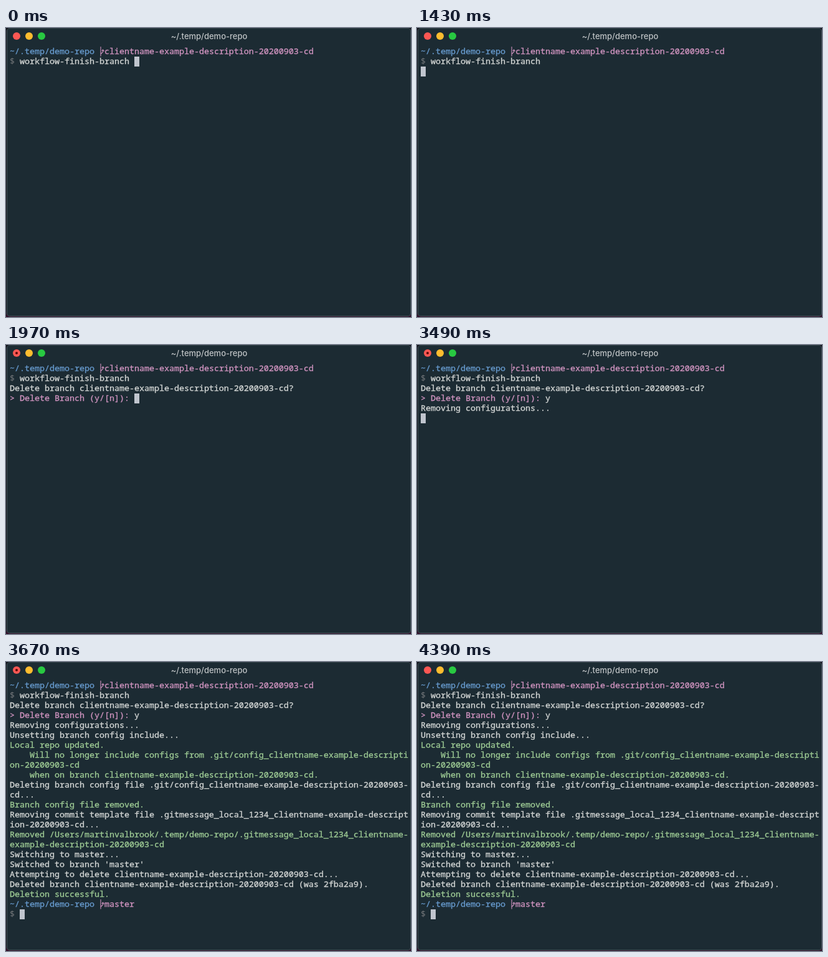
Recreate the animation shown at these times as an HTML page. Size 650 px wide and 465 px high, loop 7000 ms.

```html
<!DOCTYPE html>
<html lang="en">
<head>
<meta charset="utf-8">
<title>Terminal</title>
<style>
  html, body { margin: 0; width: 100%; height: 100%; overflow: hidden; background: #0e1018; }
  #stage { position: absolute; left: 0; top: 0; width: 650px; height: 465px; overflow: hidden;
    background: linear-gradient(#0e1018 455px, #35102c 465px); }
  #window { position: absolute; left: 1px; top: 0; width: 649px; height: 464px; box-sizing: border-box;
    background: #1c2b33; border: 1px solid #435158; border-top-color: #324047; border-radius: 5px; }
  #title { position: absolute; left: 1px; top: 5px; width: 650px; text-align: center;
    font: 500 13px/16px Inter, "Liberation Sans", sans-serif; color: #bfc3c5; }
  .light { position: absolute; top: 7px; width: 12px; height: 12px; border-radius: 50%; }
  .red { left: 11px; background: #fc5753; }
  .yellow { left: 31px; background: #fdbc2f; }
  .green { left: 51px; background: #28c941; }
  #edited { position: absolute; left: 4px; top: 4px; width: 4px; height: 4px; border-radius: 50%;
    background: #5a0507; animation: edited 7s step-end infinite; }

  #screen { position: absolute; left: 6px; top: 29px; margin: 0; color: #d2d5d4;
    font: 500 13.3333px/16px "Noto Sans Mono", "Liberation Mono", monospace;
    -webkit-text-stroke: 0.35px currentColor;
    font-variant-ligatures: none; white-space: pre; }
  #screen b, #screen i, #screen u, #screen s { font-weight: inherit; font-style: normal; text-decoration: none; }
  b { color: #6699cc; }
  i { color: #cf93bf; }
  u { color: #9dca94; }
  #screen s { color: #74777a; -webkit-text-stroke-width: 0; }
  #screen svg { width: 8px; height: 16px; vertical-align: top; overflow: visible;
    fill: none; stroke: #cf93bf; stroke-width: 1.1; }

  #cursor { position: absolute; left: 0; top: 0; width: 8px; height: 16px; background: #c0c5ce;
    animation: cursor 7s step-end infinite; }

  .ask { animation: ask 7s step-end infinite; }
  .answer { animation: answer 7s step-end infinite; }
  .work { animation: work 7s step-end infinite; }
  .done { animation: done 7s step-end infinite; }

  @keyframes ask { 0% { visibility: hidden; } 21.71%, 100% { visibility: visible; } }
  @keyframes answer { 0% { visibility: hidden; } 49.85%, 100% { visibility: visible; } }
  @keyframes work { 0% { visibility: hidden; } 51.14%, 100% { visibility: visible; } }
  @keyframes done { 0% { visibility: hidden; } 52.42%, 100% { visibility: visible; } }
  @keyframes edited {
    0% { visibility: hidden; }
    28.14% { visibility: visible; }
    62.71%, 100% { visibility: hidden; }
  }
  @keyframes cursor {
    0% { transform: translate(206px, 46px); }
    20.42% { transform: translate(6px, 62px); }
    21.71% { transform: translate(206px, 78px); }
    49.85% { transform: translate(6px, 110px); }
    51.14% { transform: translate(6px, 350px); }
    52.42%, 100% { transform: translate(22px, 398px); }
  }
</style>
</head>
<body>
<div id="stage">
  <div id="window"></div>
  <div class="light red"><div id="edited"></div></div>
  <div class="light yellow"></div>
  <div class="light green"></div>
  <div id="title">~/.temp/demo-repo</div>
  <div id="cursor"></div>
<pre id="screen"><b>~/.temp/demo-repo</b> <svg viewBox="0 0 8 16"><path id="branch" d="M2 1V16.5M2 13L5.5 9.5V6M3.8 8L5.5 5.8L7.6 8.5"/></svg><i>clientname-example-description-20200903-cd</i>
<s>$</s> workflow-finish-branch
<span class="ask">Delete branch clientname-example-description-20200903-cd?
<i>&gt; Delete Branch (y/[n]):</i> </span><span class="answer">y
Removing configurations...
</span><span class="work">Unsetting branch config include...
<u>Local repo updated.
    Will no longer include configs from .git/config_clientname-example-descripti
on-20200903-cd
    when on branch clientname-example-description-20200903-cd.</u>
Deleting branch config file .git/config_clientname-example-description-20200903-
cd...
<u>Branch config file removed.</u>
Removing commit template file .gitmessage_local_1234_clientname-example-descript
ion-20200903-cd...
<u>Removed /Users/martinvalbrook/.temp/demo-repo/.gitmessage_local_1234_clientname-
example-description-20200903-cd</u>
Switching to master...
Switched to branch 'master'
Attempting to delete clientname-example-description-20200903-cd...
</span><span class="done">Deleted branch clientname-example-description-20200903-cd (was 2fba2a9).
<u>Deletion successful.</u>
<b>~/.temp/demo-repo</b> <svg viewBox="0 0 8 16"><use href="#branch"/></svg><i>master</i>
<s>$</s> </span></pre>
</div>
</body>
</html>
```
